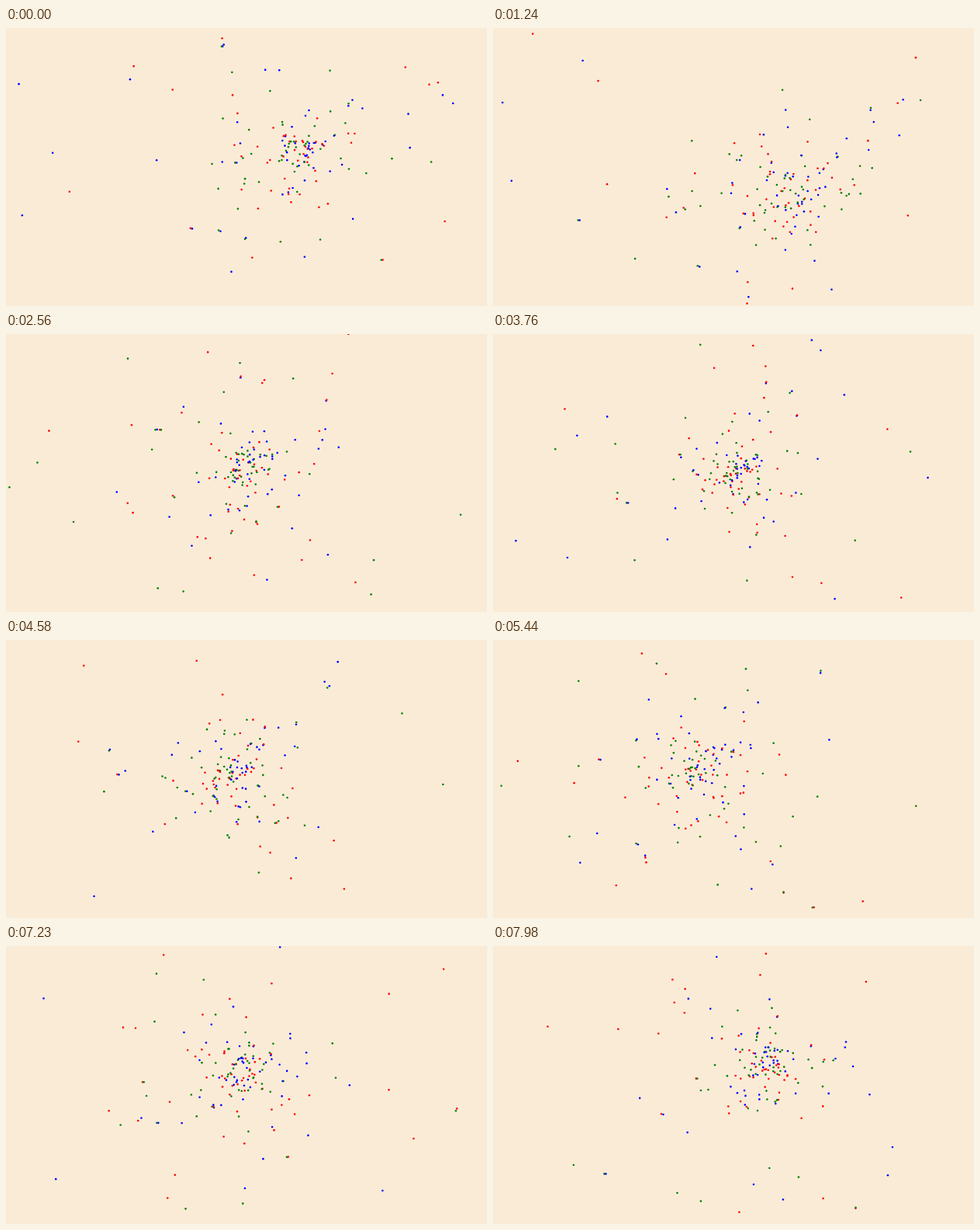
Animation of 620 by 358 pixels, one loop 8 s. Source, as an HTML page with a canvas:

```html
<!DOCTYPE html>
<html lang="en">
<head>
<meta charset="utf-8">
<title>Swarm</title>
<style>
  html, body { margin: 0; width: 100%; height: 100%; overflow: hidden; background: #faebd7; }
  canvas { display: block; width: 100%; height: 100%; }
</style>
</head>
<body>
<canvas id="stage" width="620" height="358"></canvas>
<script>
const W = 620, H = 358, LOOP = 8000, STEP = 57.45, LEAD = 8;
const COLORS = ['red', 'green', 'blue'];
const COUNT = 186;
const ctx = document.getElementById('stage').getContext('2d');

// Swarm core over time: [ms, x, y, width scale, height scale]
const CORE = [
  [0, 385, 158, 1, 1],
  [1240, 391, 222, 1.1, 1],
  [2560, 308, 172, 1.05, 1],
  [3760, 318, 176, 1.15, 1],
  [5440, 264, 167, 1.1, 1],
  [6540, 262, 166, 1, 1],
  [8000, 355, 146, 0.85, 1.05]
];

let seed = 20731;
function random() {
  seed = (seed + 0x6D2B79F5) | 0;
  let n = Math.imul(seed ^ (seed >>> 15), 1 | seed);
  n = (n + Math.imul(n ^ (n >>> 7), 61 | n)) ^ n;
  return ((n ^ (n >>> 14)) >>> 0) / 4294967296;
}
const between = (a, b) => a + (b - a) * random();
const bell = () => 2 * (random() + random() + random() - 1.5);

const dots = [];
for (let i = 0; i < COUNT; i++) {
  const follows = i % 10 === 9;
  const leader = dots[i - 1];
  dots.push(follows ? {
    ...leader,
    color: COLORS[i % 3],
    dx: between(-3, 3),
    dy: between(-3, 3)
  } : {
    color: COLORS[i % 3],
    size: 4.08 + 0.75 * bell(),
    swing: between(0.8, 1.5),
    rate: between(0.7, 1.5),
    phase: between(0, 2 * Math.PI),
    angle: between(0, 2 * Math.PI),
    turn: between(-0.35, 0.35),
    dx: 0,
    dy: 0
  });
}

function coreAt(ms) {
  let i = 0;
  while (i < CORE.length - 2 && ms >= CORE[i + 1][0]) i++;
  const a = CORE[i], b = CORE[i + 1];
  const u = (ms - a[0]) / (b[0] - a[0]);
  const ease = u * u * (3 - 2 * u);
  return a.map((v, k) => v + (b[k] - v) * ease);
}

function place(dot, s, [, cx, cy, sx, sy]) {
  const r = Math.exp(dot.size + dot.swing * Math.sin(dot.rate * s + dot.phase));
  const angle = dot.angle + dot.turn * s;
  // Far dots feel less of the core's drift.
  const hold = 1 / (1 + r / 250);
  return [
    W / 2 + (cx - W / 2) * hold + 1.1 * sx * r * Math.cos(angle) + dot.dx,
    H / 2 + (cy - H / 2) * hold + 0.95 * sy * r * Math.sin(angle) + dot.dy
  ];
}

function draw(ms) {
  const held = Math.max(0, Math.floor((ms + LEAD) / STEP) * STEP - LEAD);
  const core = coreAt(held);
  ctx.fillStyle = '#faebd7';
  ctx.fillRect(0, 0, W, H);
  for (const dot of dots) {
    const [x, y] = place(dot, held / 1000, core);
    ctx.fillStyle = dot.color;
    ctx.beginPath();
    ctx.arc(x, y, 1.3, 0, 2 * Math.PI);
    ctx.fill();
  }
}

const start = performance.now();
function frame() {
  draw((performance.now() - start) % LOOP);
  requestAnimationFrame(frame);
}
frame();
</script>
</body>
</html>
```
